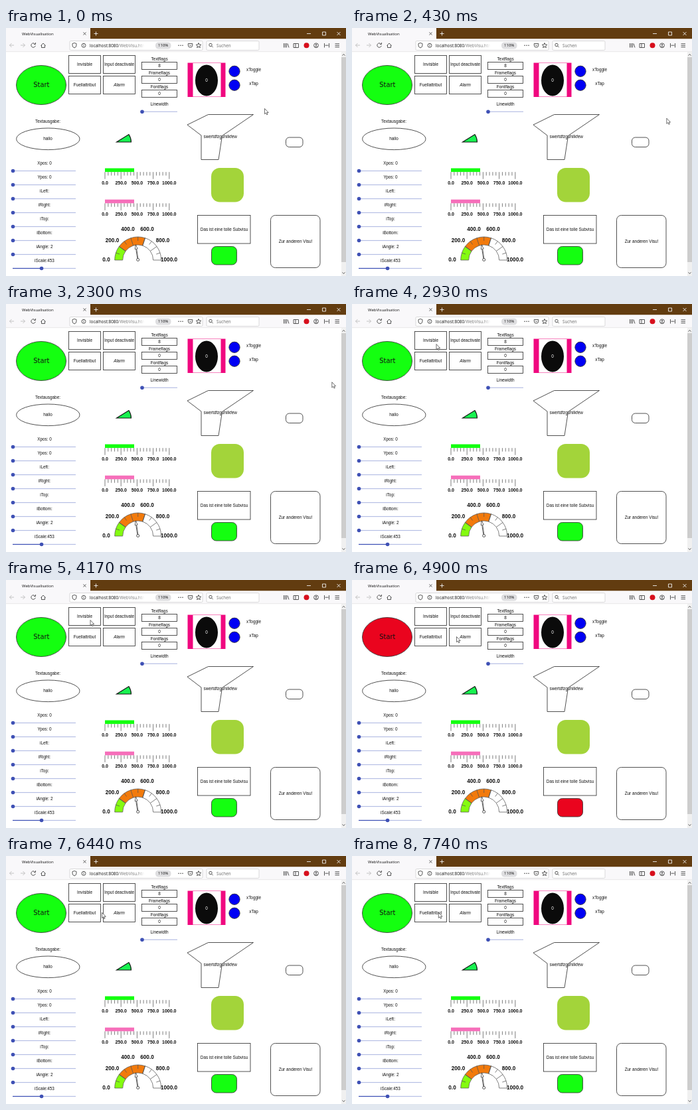
An HTML page for the animation above (8000 ms loop, 512 by 374 pixels).

```html
<!DOCTYPE html>
<html lang="de">
<head>
<meta charset="utf-8">
<title>WebVisualisation</title>
<style>
html, body { margin: 0; height: 100%; overflow: hidden; background: #fff; }
svg { display: block; }
text { font: 6.4px "Liberation Sans", Arial, sans-serif; fill: #111; }
.ui { font: 6px "Open Sans", "Noto Sans", sans-serif; }
.scale { font-weight: bold; font-size: 7px; }
.dial { font-weight: bold; font-size: 8.2px; }
#start { font: 9.8px "DejaVu Sans", sans-serif; }
.line { fill: none; stroke: #333; stroke-width: .85; }
.tick { fill: none; stroke: #555; stroke-width: .75; }
.icon { fill: none; stroke: #444; stroke-width: .9; }
</style>
</head>
<body>
<svg id="stage" width="512" height="374" viewBox="0 0 512 374"></svg>
<script>
const stage = document.getElementById('stage');

function add(tag, attrs, content) {
  const el = document.createElementNS('http://www.w3.org/2000/svg', tag);
  for (const key in attrs) el.setAttribute(key, attrs[key]);
  if (content) el.textContent = content;
  stage.append(el);
  return el;
}
const fillBox = (x, y, width, height, fill, rx = 0) => add('rect', { x, y, width, height, fill, rx });
const path = (d, cls = 'line', more) => add('path', { d, class: cls, ...more });
const text = (x, y, str, more) => add('text', { x, y, 'text-anchor': 'middle', ...more }, str);
const dot = (cx, cy, r, fill, more) => add('circle', { cx, cy, r, fill, ...more });
const frame = (x, y, width, height, rx = 0, fill = 'none') =>
  add('rect', { x, y, width, height, rx, class: 'line', style: `fill:${fill}` });
const oval = (cx, cy, rx, ry, fill = 'none') =>
  add('ellipse', { cx, cy, rx, ry, class: 'line', style: `fill:${fill}` });

const GREEN = '#14ff10', RED = '#ea041e', BLUE = '#3f51b5';

function browser() {
  const left = { 'text-anchor': 'start', class: 'ui' };
  const bar = '#f9f8fa';
  fillBox(0, 0, 512, 16.5, '#623c10');
  fillBox(0, 0, 127, 17, bar);
  text(24, 10.8, 'WebVisualisation', left);
  path('M116.5 6.5l4 4m0-4l-4 4', 'icon');
  path('M132.500 8.500h6m-3-3v6M453 8.500h6M476.500 6h5v5h-5zM498.500 6l5 5m0-5l-5 5', 'icon', { style: 'stroke:#eee' });

  fillBox(0, 16.5, 512, 19.5, bar);
  fillBox(0, 35.5, 512, .6, '#ddd');
  path('M12 26H5.500m3-3l-3 3l3 3M22 26h6.500m-3-3l3 3l-3 3', 'icon', { style: 'stroke:#bbb' });
  path('M43.500 24a3.200 3.200 0 1 0 .7 2.700M44.500 22v2.500h-2.500', 'icon');
  path('M52.500 26.500l3.500-3.500l3.500 3.500M53.500 26v3.500h5V26', 'icon');

  for (const [x, w] of [[96, 200], [302, 79]])
    add('rect', { x, y: 19.5, width: w, height: 14, rx: 1.5, fill: '#fff', stroke: '#ccc', 'stroke-width': .7 });
  path('M103 22.500l3 1v2.500q0 3-3 4q-3-1-3-4v-2.500z', 'icon');
  dot(117, 26.3, 3, 'none', { class: 'icon' });
  path('M117 25.800v2m0-3.500v.8', 'icon');
  const url = text(126, 28.6, 'localhost:8080', { ...left, style: 'font-size:6.4px' });
  const tail = document.createElementNS(stage.namespaceURI, 'tspan');
  tail.textContent = '/WebVisu.htm';
  tail.style.fill = '#777';
  url.append(tail);
  const fade = add('linearGradient', { id: 'fade' });
  fade.innerHTML = '<stop stop-color="#fff" stop-opacity="0"/><stop offset=".7" stop-color="#fff"/>';
  fillBox(198, 21, 15, 11, 'url(#fade)');
  fillBox(225, 21.5, 23.5, 10, '#dedee0', 4.5);
  text(236.7, 28.4, '110%', { class: 'ui' });
  for (const x of [260, 263, 266]) dot(x, 26.2, .8, '#444');
  path('M274.300 23.500h6.500v2.500a3.200 3.200 0 0 1-6.500 0zM276 25.500l1.600 1.500l1.600-1.500', 'icon');
  path('M290 22.500l1.100 2.500l2.600.2l-2 1.800l.7 2.700l-2.400-1.500l-2.400 1.500l.7-2.700l-2-1.800l2.600-.2z', 'icon');
  dot(308, 25.5, 2.2, 'none', { class: 'icon' });
  path('M309.700 27.200l2 2', 'icon');
  text(317, 28.6, 'Suchen', { ...left, style: 'fill:#666;font-size:6.3px' });

  path('M418.500 23v6.500m2-6.500v6.500m2-6.500v6.500m1.500-6l2 6M433 23.500h7.500v6H433zM436 23.500v6', 'icon');
  dot(452.5, 26.3, 4, '#d70f1c');
  dot(467, 26.3, 3.4, 'none', { class: 'icon' });
  dot(467, 25.3, 1.1, '#444');
  path('M465 28.500q2-2 4 0M479.500 23v6.500m7-6.500v6.500M480.500 26.200h5M495.500 23.800h6.500m-6.500 2.500h6.500m-6.500 2.500h6.500', 'icon');

  fillBox(505, 36.2, 7, 338, '#f0f0f0');
  fillBox(505, 44, 7, 309, '#cdcdcd');
  path('M506.500 41.500l2-2l2 2M506.500 368.500l2 2l2-2', 'icon');
}

function slider(x, y, width, value = 0) {
  fillBox(x, y - .6, width, 1.2, '#b5bee4');
  fillBox(x, y - .6, width * value, 1.2, BLUE);
  dot(x + .5 + width * value, y, 2.8, BLUE);
}

function barGraph(y, fill) {
  fillBox(149, y, 44, 5.6, fill);
  let d = '';
  for (let i = 0; i <= 20; i++) d += `M${149 + i * 4.84} ${y + 5.7}v${i % 5 ? 5.3 : 10.5}`;
  path(d, 'tick');
  for (let i = 0; i < 5; i++)
    text(149 + i * 24.2, y + 24.3, (i * 250).toFixed(1), { class: 'scale' });
}

function gauge(cx, cy, outer, inner) {
  const at = (value, r) => {
    const a = Math.PI * (1 - value / 1000);
    return `${cx + r * Math.cos(a)} ${cy - r * Math.sin(a)}`;
  };
  const ring = (from, to, fill) => path(
    `M${at(from, outer)}A${outer} ${outer} 0 0 1 ${at(to, outer)}L${at(to, inner)}` +
    `A${inner} ${inner} 0 0 0 ${at(from, inner)}z`, 'tick', { style: `fill:${fill}` });
  ring(0, 200, '#84fb10');
  ring(200, 600, '#f27a0c');
  ring(600, 1000, '#fff');
  for (let v = 100; v < 1000; v += 100)
    path(`M${at(v, v % 200 ? 29 : inner)}L${at(v, outer)}`, 'tick');
  path('M-.5 0V-17H-2L0-23.500L2-17H.5V0z', 'line',
    { transform: `translate(${cx} ${cy}) rotate(-8.5)`, style: 'fill:#fff;stroke-width:.7' });
  dot(cx, cy - .5, 2, '#fff', { class: 'line', style: 'fill:#fff' });
  [[151, 352], [160, 323], [183.5, 306], [212.5, 306], [236, 323], [245.5, 352]]
    .forEach(([x, y], i) => text(x, y, (i * 200).toFixed(1), { class: 'dial' }));
}

browser();

const lamp = oval(53, 86, 37.5, 29.5, GREEN);
text(53.3, 89.2, 'Start', { id: 'start' });

['Invisible', 'Input deactivate', 'Fuellattribut', 'Alarm'].forEach((label, i) => {
  const x = 94.5 + i % 2 * 52, y = 41.5 + (i >> 1) * 31;
  frame(x, y, 48, 27);
  text(x + 24, y + 15, label, { style: i == 3 ? 'font-style:italic' : '' });
});

['Textflags', 'Frameflags', 'Fontflags'].forEach((label, i) => {
  const y = 48.5 + i * 21;
  text(231, y, label);
  frame(204.5, y + 3, 53, 11);
  text(231, y + 10.8, i ? '0' : '8');
});
text(231, 117, 'Linewidth');
slider(204.5, 126.2, 53.5);

fillBox(273.5, 52.5, 57, 51.5, '#f0087f');
fillBox(281.5, 53, 42, 50.5, '#fff');
add('ellipse', { cx: 302, cy: 79, rx: 17, ry: 23.5, fill: '#0b0b0b' });
text(302, 80.5, '0', { style: 'fill:#fff' });

for (const y of [65.3, 86.2]) oval(344, y, 8.2, 8.2, '#0000f4');
text(373, 65, 'xToggle');
text(373, 85.7, 'xTap');

text(63, 143, 'Textausgabe:');
oval(63.3, 167.3, 47.7, 16.3);
text(63, 169.3, 'hallo');

path('M166.500 172L185 160.500Q188.500 166 188.500 172z', 'line', { style: 'fill:#18f250;stroke:#111;stroke-width:1.1' });
path('M304.500 130.500H372.500L325.500 162.500L320 198.500H294V162L273 146z');
text(322.7, 166, 'swertdfzguhilkfew');
frame(421.5, 165, 25.5, 14.5, 5);
fillBox(309, 211, 49, 51.5, '#a3d43a', 13);

['Xpos: 0', 'Ypos: 0', 'iLeft:', 'iRight:', 'iTop:', 'iBottom:', 'iAngle: 2', 'iScale:453'].forEach((label, i) => {
  text(58, 205.8 + i * 21, label);
  slider(10, 215.5 + i * 21, 95, i == 7 ? .453 : 0);
});

barGraph(211.5, GREEN);
barGraph(258.7, '#f66fba');
gauge(198.7, 350, 35, 23);

frame(288.5, 282.5, 79.5, 42.5);
text(328.5, 306, 'Das ist eine tolle Subvisu');
const signal = frame(309.5, 329.5, 38, 27.5, 7, GREEN);
frame(398.5, 282.5, 74.5, 79, 7);
text(436, 324.3, 'Zur anderen Visu!');

const cursor = path('M0 0V8.200L1.900 6.500L3.200 9.300L4.500 8.700L3.300 6H5.700z', 'line',
  { style: 'fill:#fff;stroke-width:.7' });

// Pointer moves: start, end, from x, y, to x, y, ease-out power
const moves = [
  [30, 830, 389.5, 121.5, 525, 145, 1.4],
  [2300, 2930, 492, 118, 127, 60.5, 2],
  [4490, 4630, 127, 60.5, 157.5, 85.5, 1.4],
  [6230, 6770, 157.5, 85.5, 130.3, 85.2, 1.3]
];

function draw() {
  const t = performance.now() % 8000;
  const [t0, t1, x0, y0, x1, y1, power] = moves.findLast(m => t >= m[0]) || moves[0];
  const p = Math.min(1, Math.max(0, (t - t0) / (t1 - t0)));
  const k = 1 - (1 - p) ** power;
  cursor.setAttribute('transform', `translate(${x0 + (x1 - x0) * k} ${y0 + (y1 - y0) * k})`);
  lamp.style.fill = signal.style.fill = t >= 4770 && t < 5740 ? RED : GREEN;
  requestAnimationFrame(draw);
}
draw();
</script>
</body>
</html>
```
